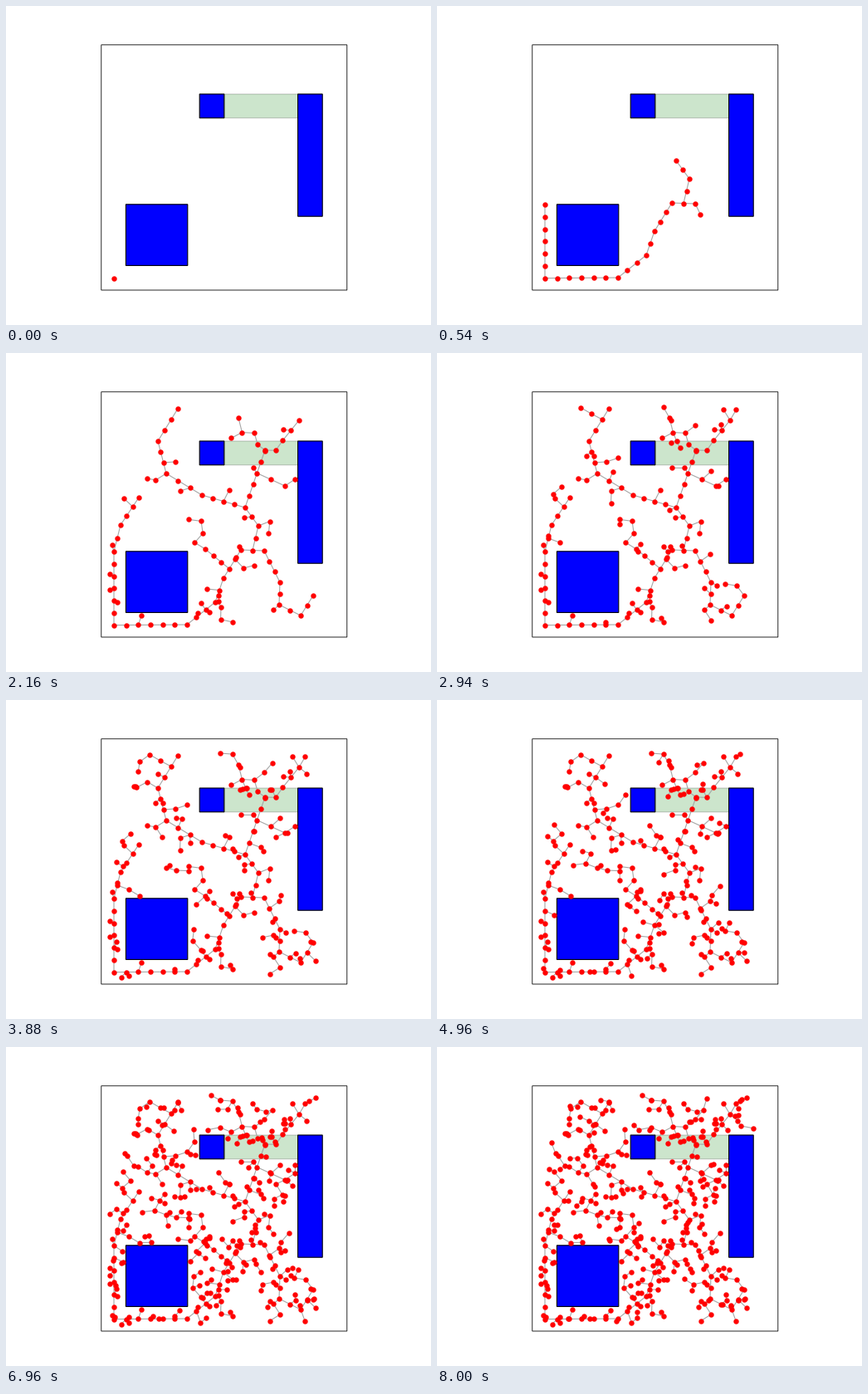
A matplotlib script for the animation above (8020 ms loop, 512 by 384 pixels).

```python
import numpy as np
import matplotlib.pyplot as plt
from matplotlib.animation import FuncAnimation
from matplotlib.patches import Rectangle

W, H, DPI = 512, 384, 100
FRAMES, INTERVAL = 401, 20
SCALE = 0.8                       # the plot is laid out at 640 x 480
LEFT, BOTTOM, UNIT = 143.2, 427.2, 36.96
STEP = 14.8                       # longest edge of the tree
REACH = 2 * STEP                  # farthest useful random sample
ROOT = (130, 327.6)

BLOCKS = [(1, 1, 2.5, 2.5), (4, 7, 1, 1), (8, 3, 1, 5)]   # x, y, w, h in units
GOAL_AREA = (5, 7, 3, 1)

# Turning points and tips that the tree heads for, in order.
TRUNK = [(218, 327), (252, 300), (262, 271), (283, 237), (311, 238),
         (304, 208), (288, 186), (130, 239), (330, 276), (236, 171),
         (240, 236), (312, 117)]
LIMBS = [(193, 145), (183, 106), (280, 78), (353, 81), (336, 160),
         (329, 303), (355, 316), (138, 207), (160, 174), (207, 67),
         (370, 292)]


def snap(v):
    return SCALE * (np.floor(v + 0.5) + 0.5)


def to_px(x, y, w, h):
    """Left, top, right and bottom of a box given in plot units."""
    return (snap(LEFT + x * UNIT), snap(BOTTOM - (y + h) * UNIT),
            snap(LEFT + (x + w) * UNIT), snap(BOTTOM - y * UNIT))


WALLS = [to_px(*b) for b in BLOCKS]


def is_free(a, b, pad=3):
    """True if the edge from a to b stays clear of every block."""
    for t in (0.25, 0.5, 0.75, 1):
        x, y = a + (b - a) * t
        for x0, y0, x1, y1 in WALLS:
            if x0 - pad < x < x1 + pad and y0 - pad < y < y1 + pad:
                return False
    return True


def nearest(pts, p):
    d = np.hypot(*(np.array(pts) - p).T)
    i = int(d.argmin())
    return i, d[i]


def grow_tree(seed=7):
    """Random tree with one node per frame, led along the key points."""
    rng = np.random.default_rng(seed)
    pts, parents = [np.array(ROOT)], [0]
    keys = [np.array(p) for p in TRUNK + LIMBS]
    while len(pts) < FRAMES:
        k = len(pts)
        if keys and (k <= 41 or k > 54 and k % 3):
            i, d = nearest(pts, keys[0])
            n = max(1, round(d / STEP))
            p = pts[i] + (keys[0] - pts[i]) / n
            if n == 1:
                keys.pop(0)
        else:
            target = rng.uniform((124, 54), (383, 335))
            i, d = nearest(pts, target)
            p = pts[i] + (target - pts[i]) * min(1, STEP / d)
            if d > REACH or not is_free(pts[i], p):
                continue
        pts.append(p)
        parents.append(i)
    return np.array(pts), np.array(parents)


nodes, parents = grow_tree()
gaps = np.full_like(nodes, np.nan)
edges = np.stack([nodes[parents], nodes, gaps], axis=1).reshape(-1, 2)

fig = plt.figure(figsize=(W / DPI, H / DPI), dpi=DPI, facecolor="white")
ax = fig.add_axes([0, 0, 1, 1])
ax.set(xlim=(0, W), ylim=(H, 0))
ax.axis("off")


def add_rect(box, **style):
    x0, y0, x1, y1 = to_px(*box)
    ax.add_patch(Rectangle((x0, y0), x1 - x0, y1 - y0, snap=False, **style))


add_rect(GOAL_AREA, fc="green", ec="black", alpha=0.2, lw=0.8, zorder=1)
for block in BLOCKS:
    add_rect(block, fc="blue", ec="black", lw=0.8, zorder=1)
add_rect((0, 0, 10, 10), fc="none", ec="black", lw=0.6, zorder=5)

lines, = ax.plot([], [], color="0.65", lw=0.8, zorder=2)
dots, = ax.plot([], [], "o", color="red", ms=4.5, mew=0.1, snap=False, zorder=3)


def draw(k):
    lines.set_data(*edges[:3 * (k + 1)].T)
    dots.set_data(*nodes[:k + 1].T)
    return lines, dots


anim = FuncAnimation(fig, draw, frames=FRAMES, init_func=lambda: draw(0),
                     interval=INTERVAL, repeat=True, repeat_delay=0)
plt.show()
```
